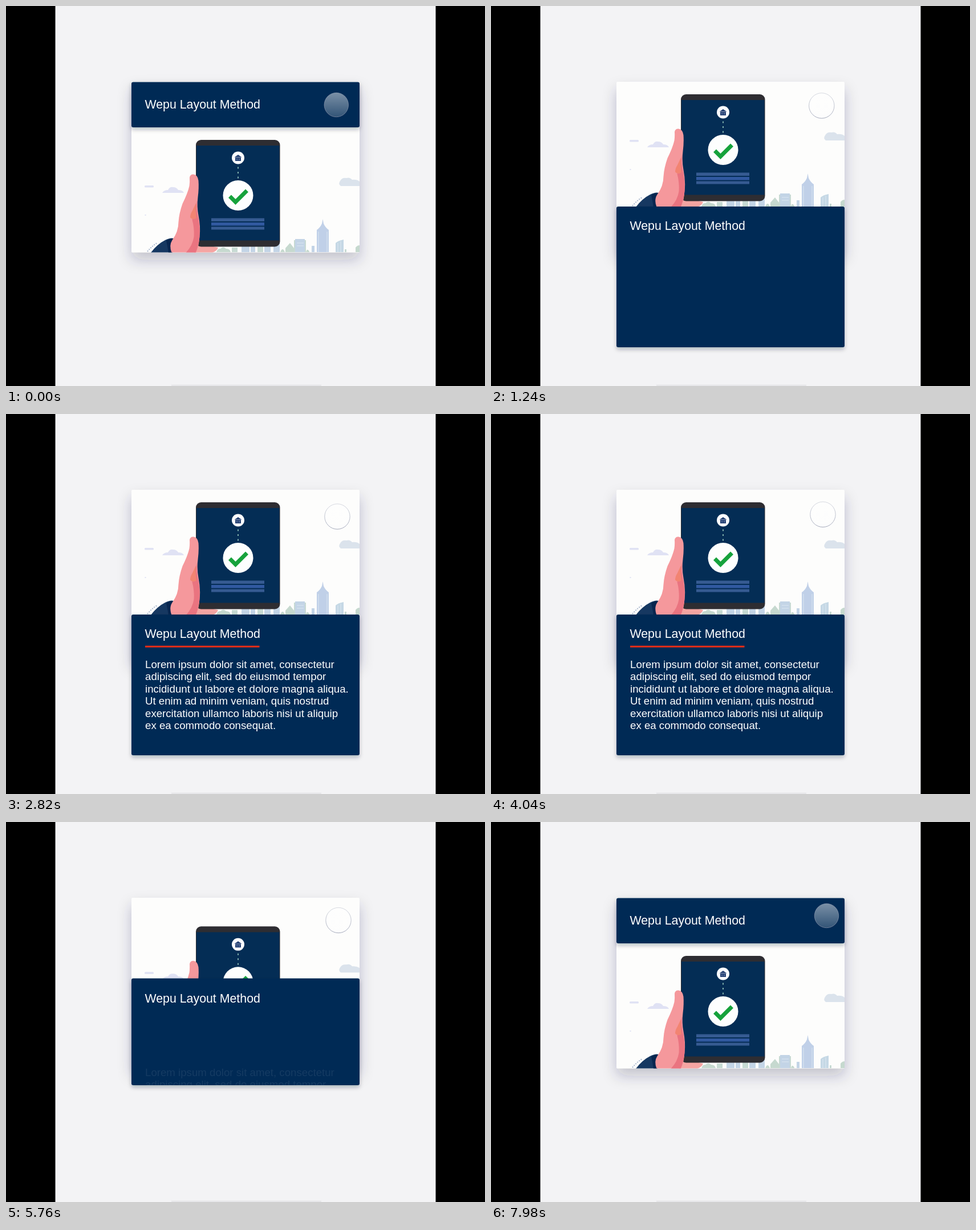
These frames come from a looping animation (840 px wide and 667 px high, 8000 ms). An HTML page:

```html
<!DOCTYPE html>
<html lang="en">
<head>
<meta charset="utf-8">
<title>Expanding card</title>
<style>
  html, body { margin: 0; width: 100%; height: 100%; overflow: hidden; background: #000; }
  svg { display: block; width: 100%; height: 100%; }
  text { font-family: "Liberation Sans", Arial, sans-serif; fill: #fff; }
</style>
</head>
<body>
<svg viewBox="0 0 840 667">
  <defs>
    <clipPath id="cardClip"><rect x="220" y="133" width="400" height="299.5"/></clipPath>
    <clipPath id="panelClip"><rect class="panel" x="220" width="400"/></clipPath>
    <filter id="cardShadow" x="-20%" y="-20%" width="140%" height="150%">
      <feDropShadow dx="0" dy="13" stdDeviation="12" flood-color="#20204c" flood-opacity=".23"/>
    </filter>
    <filter id="panelShadow" x="-10%" y="-20%" width="120%" height="160%">
      <feDropShadow dx="0" dy="4" stdDeviation="3.5" flood-color="#0c1636" flood-opacity=".27"/>
    </filter>
    <linearGradient id="glass" x1="0" y1="0" x2="0" y2="1">
      <stop offset="0" stop-color="#fff" stop-opacity=".48"/>
      <stop offset="1" stop-color="#fff" stop-opacity=".2"/>
    </linearGradient>
    <linearGradient id="rim" x1="0" y1="0" x2="0" y2="1">
      <stop offset="0" stop-color="#b0b5c4" stop-opacity=".5"/>
      <stop offset="1" stop-color="#858ca4" stop-opacity=".75"/>
    </linearGradient>
  </defs>

  <rect width="840" height="667"/>
  <rect x="86.5" width="667" height="667" fill="#f3f3f5"/>
  <rect x="290" y="664.5" width="263" height="2.5" fill="#e7e7ea"/>

  <rect x="220" y="133" width="400" height="299.5" rx="2" fill="#fdfdfc" filter="url(#cardShadow)"/>
  <g clip-path="url(#cardClip)">
    <g id="scene">
      <!-- sky -->
      <g fill="#e0e2f4">
        <rect x="243" y="315" width="16" height="3.5" rx="1.5"/>
        <path d="M274 328q3-5 10-5q3-6 9-5q6 0 9 5q8 0 10 5z"/>
        <rect x="243.5" y="366" width="2" height="2"/>
        <path fill="#dbe3ec" d="M587 316q-5-4-1-9q3-6 11-5q6-2 10 3q8-1 13 3v8z"/>
      </g>
      <!-- skyline -->
      <g id="city"></g>
      <path fill="#c0d0e8" d="M545 432V393q6-4 9-11l1.500-8l1.500 8q3 7 9 11v39z"/>
      <path fill="#c5d8e5" d="M578 432v-16q4-4 14-6v22z"/>
      <g fill="#c6d9cf">
        <path d="M369 432q2-7 7-6q5-5 10 0q7 0 8 6z"/>
        <path d="M490 432v-7l8-9l7 9v7z"/>
        <path d="M526 432q2-8 6-1v1zM481 432q4-10 8 0zM613 432v-8q3-4 7-4v12z"/>
      </g>
      <path d="M548 396v36M563 396v36M582 416v16M587 413v19M510 416h12M510 421h12" stroke="#dce7f2" fill="none"/>
      <!-- sleeve and palm -->
      <path d="M248 431q7-9 17-15" stroke="#a9b7cd" stroke-width="2" stroke-dasharray="2 2" fill="none"/>
      <path d="M254 433q11-15 25-22q11-6 18-2l-5 24z" fill="#163861"/>
      <path d="M281 412q10-6 17-3l-7 24h-6q-2-12-4-21z" fill="#08264f"/>
      <path d="M330 433l4-18l38 9q-2 6-10 9z" fill="#f5a5a2"/>
      <!-- tablet -->
      <rect x="333" y="235" width="147.500" height="187.500" rx="9" fill="#2e2d32"/>
      <rect x="334" y="245" width="145.500" height="166.500" fill="#042d55"/>
      <circle cx="407" cy="266.500" r="11" fill="#fbfcff"/>
      <path d="M400.500 265.500l6.500-4.500l6.500 4.500zM402 266h10v6h-10z" fill="#233f72"/>
      <path d="M405 267.500v3M409 267.500v3" stroke="#8fa1c4" fill="none"/>
      <path d="M407 282.500v20" stroke="#7fb0ac" stroke-width="2" stroke-dasharray="3 5.500" fill="none"/>
      <circle cx="407" cy="332.500" r="26.500" fill="#fdfefe"/>
      <path d="M392.500 334l10 10l20-20" fill="none" stroke="#16a23c" stroke-width="7"/>
      <g fill="#365b92">
        <rect x="360" y="372.500" width="93" height="5.500"/>
        <rect x="360" y="380" width="93" height="5.500" fill="#3159a0"/>
        <rect x="360" y="387.500" width="93" height="5"/>
      </g>
      <!-- hand -->
      <path d="M322 301q1-6 7-5.500q7 1 8.500 11q1 13-1 29q-2 16 1 32q4 20 2 37q-1 16-6 28.500h-43q-5-13 1-22q11-15 11-32q1-15 7-32q9-18 12-31q1-7 0.500-15z" fill="#f5989c"/>
      <path d="M335 341q-2 16 2.500 33q3 16 2 31q-2 17-7 28h-17q12-13 14-28q1-15-3-30q4-16 8.500-34z" fill="#ea7480"/>
      <path d="M333 346q-1 15 1 26q-7 5-11-1q0-6 4-12z" fill="#f28472"/>
    </g>
  </g>

  <rect class="panel" x="220" width="400" rx="3" fill="#042c55" filter="url(#panelShadow)"/>
  <text id="title" x="243.500" font-size="21.333">Wepu Layout Method</text>
  <rect id="line" x="244" y="406.700" height="3" fill="#ea2d16"/>
  <g clip-path="url(#panelClip)"><g id="copy" font-size="18.667"></g></g>
  <circle id="dot" fill="url(#glass)" stroke="url(#rim)"/>
</svg>
<script>
const LOOP = 8000;
const $ = id => document.getElementById(id);
const panels = document.querySelectorAll('.panel');
const ns = 'http://www.w3.org/2000/svg';

function add(parent, tag, attrs, content = '') {
  const el = document.createElementNS(ns, tag);
  for (const key in attrs) el.setAttribute(key, attrs[key]);
  el.textContent = content;
  parent.append(el);
}

[
  'Lorem ipsum dolor sit amet, consectetur',
  'adipiscing elit, sed do eiusmod tempor',
  'incididunt ut labore et dolore magna aliqua.',
  'Ut enim ad minim veniam, quis nostrud',
  'exercitation ullamco laboris nisi ut aliquip',
  'ex ea commodo consequat.'
].forEach((s, i) => add($('copy'), 'text', { x: 244, y: 446 + i * 21.4 }, s));

// x, width, height of each block
[[396, 10, 8], [413, 14, 22], [429, 8, 12], [441, 10, 15], [453, 11, 29],
 [469, 11, 16], [505, 21, 21], [507, 17, 23], [536, 5, 11], [594, 3, 5]]
  .forEach(([x, width, h], i) => add($('city'), 'rect',
    { x, width, y: 432 - h, height: h, fill: i % 3 ? '#c3d4e6' : '#c7dad3' }));

// cubic-bezier(.25, .1, .25, 1)
function ease(x) {
  if (x <= 0) return 0;
  if (x >= 1) return 1;
  let lo = 0, hi = 1, s = .5;
  for (let i = 0; i < 24; i++) {
    s = (lo + hi) / 2;
    if (.75 * s * (1 - s) + s ** 3 < x) lo = s; else hi = s;
  }
  return .3 * s * (1 - s) ** 2 + 3 * s * s * (1 - s) + s ** 3;
}
const shown = (t, start, end) => ease((t - start) / 500) - ease((t - end) / 500);
const mix = (a, b, p) => a + (b - a) * p;

// time, x, y
const pointer = [
  [0, 579.3, 173.5], [860, 579, 174], [1800, 581, 176.3], [2820, 581, 180],
  [5300, 583, 172.5], [5760, 583, 172.5], [7980, 588.5, 164.5], [LOOP, 588.5, 164.5]
];
function pointerAt(t) {
  const i = pointer.findIndex(k => k[0] > t);
  const [t0, x0, y0] = pointer[i - 1], [t1, x1, y1] = pointer[i];
  const p = (t - t0) / (t1 - t0);
  return [mix(x0, x1, p), mix(y0, y1, p)];
}

function draw(t) {
  const open = shown(t, 716, 5648);
  for (const p of panels) {
    p.setAttribute('y', mix(133.5, 352, open));
    p.setAttribute('height', mix(79.5, 247, open));
  }
  $('scene').setAttribute('transform', `translate(0 ${-80 * open})`);
  $('title').setAttribute('y', mix(180, 392.5, open));
  $('copy').setAttribute('opacity', shown(t, 1632, 5430));
  $('line').setAttribute('width', 200.5 * shown(t, 2100, 5155));

  const [x, y] = pointerAt(t);
  $('dot').setAttribute('cx', x);
  $('dot').setAttribute('cy', y);
  $('dot').setAttribute('r', mix(21.2, 22.2, Math.min(1, open * 2)));
}

const begin = performance.now();
function tick() {
  draw((performance.now() - begin) % LOOP);
  requestAnimationFrame(tick);
}
draw(0);
requestAnimationFrame(tick);
</script>
</body>
</html>
```
